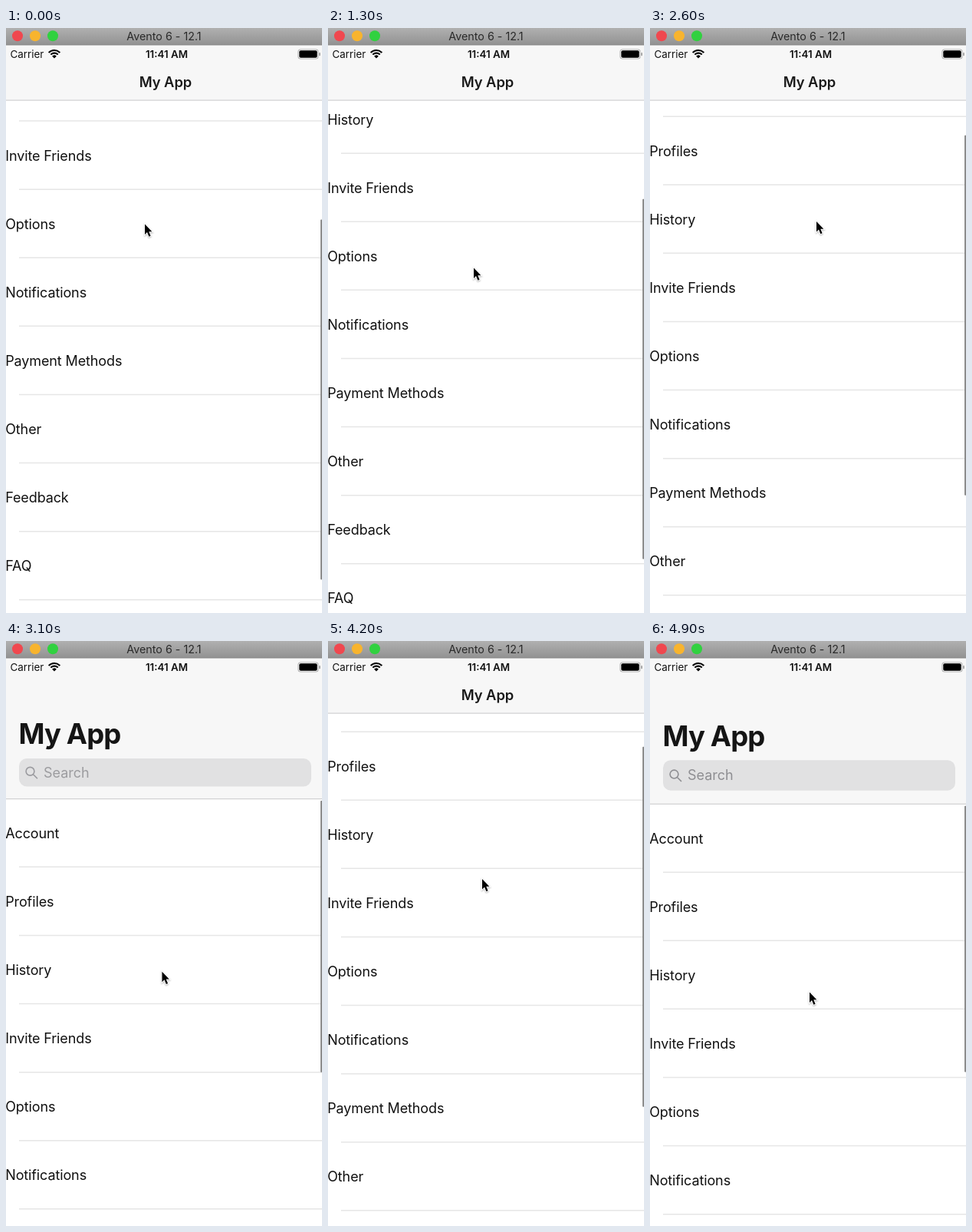
Animation, 412 px wide and 762 px high, one loop 5 s. Source, as an HTML page with a canvas:

```html
<!DOCTYPE html>
<html lang="en">
<head>
<meta charset="utf-8">
<title>My App</title>
<style>
html, body { margin: 0; width: 100%; height: 100%; overflow: hidden; background: #fff; }
canvas { display: block; width: 412px; height: 762px; }
</style>
</head>
<body>
<canvas id="stage"></canvas>
<script>
const W = 412, HT = 762, LOOP = 5000, STEP = 100;
const NAV = 94, REST = 210, ROW = 89.1;
const FONT = 'Inter, "Liberation Sans", sans-serif';
const ROWS = ['Account', 'Profiles', 'History', 'Invite Friends', 'Options',
  'Notifications', 'Payment Methods', 'Other', 'Feedback', 'FAQ'];

// [time, centre of the first row]
const SCROLL = [[0, -101.3], [350, -106], [700, -104], [1000, -88], [1300, -59.2],
  [1500, 75], [1750, 254], [1900, 242], [2250, 140], [2600, 71], [2700, 78],
  [3000, 225], [3200, 262], [3400, 255], [3700, 253], [4200, 74], [4350, 78],
  [4750, 263], [4900, 257]];
// [time, x, y] of the pointer tip
const POINTER = [[0, 181, 255.5], [350, 181, 251], [700, 184, 255], [1000, 187, 275],
  [1300, 190, 312.5], [1500, 193, 385], [1700, 194, 413], [1900, 195.5, 402],
  [2250, 206, 320], [2600, 217, 252], [2700, 216, 256], [3000, 206, 410],
  [3250, 201, 446], [3600, 200, 441.5], [3750, 200, 436], [4200, 201, 310],
  [4350, 202, 314], [4700, 207, 452], [4900, 208, 457.5]];

const canvas = document.getElementById('stage');
const dpr = window.devicePixelRatio || 1;
canvas.width = W * dpr;
canvas.height = HT * dpr;
const g = canvas.getContext('2d');
g.scale(dpr, dpr);

const clamp = (v, a = 0, b = 1) => Math.min(b, Math.max(a, v));

// Monotone cubic through the keys: flat at turning points, smooth elsewhere
function curve(keys, t, k = 1) {
  const n = keys.length - 1;
  if (t >= keys[n][0]) return keys[n][k];
  const i = keys.findIndex((p, j) => j < n && t < keys[j + 1][0]);
  const rate = j => (keys[j + 1][k] - keys[j][k]) / (keys[j + 1][0] - keys[j][0]);
  const slope = j => {
    if (j === 0 || j === n) return 0;
    const a = rate(j - 1), b = rate(j);
    return a * b > 0 ? 2 * a * b / (a + b) : 0;
  };
  const d = keys[i + 1][0] - keys[i][0], u = (t - keys[i][0]) / d, v = 1 - u;
  return v * v * (1 + 2 * u) * keys[i][k] + u * u * (3 - 2 * u) * keys[i + 1][k]
    + d * u * v * (v * slope(i) - u * slope(i + 1));
}

function rect(x, y, w, h, color, r = 0) {
  g.fillStyle = color;
  g.beginPath();
  g.roundRect(x, y, w, h, r);
  g.fill();
}

function dot(x, y, r, color) {
  g.fillStyle = color;
  g.beginPath();
  g.arc(x, y, r, 0, 7);
  g.fill();
}

function text(s, x, y, size, { weight = 400, color = '#111', align = 'left', gap = 0 } = {}) {
  g.font = `${weight} ${size}px ${FONT}`;
  g.letterSpacing = gap + 'px';
  g.textAlign = align;
  g.fillStyle = color;
  g.fillText(s, x, y);
}

function drawList(first) {
  ROWS.forEach((name, i) => {
    const y = first + i * ROW;
    text(name, -0.8, y + 6.6, 18, { gap: -0.12 });
    rect(17, y + 43.4, W - 17, 1.5, '#e6e6e6');
  });
}

function drawSearch(top, h) {
  if (h <= 0) return;
  rect(17, top, 381, h, '#e1e1e2', Math.min(10, h / 2));
  g.globalAlpha = clamp((h - 29) / 9);
  const y = top + h / 2;
  g.strokeStyle = '#8e8e92';
  g.lineWidth = 1.6;
  g.beginPath();
  g.arc(31.5, y - 1.5, 5.4, 0, 7);
  g.moveTo(35.5, y + 2.5);
  g.lineTo(41, y + 8);
  g.stroke();
  text('Search', 49, y + 6.3, 18, { color: '#8e8e92' });
  g.globalAlpha = 1;
}

function drawHeader(bottom) {
  rect(0, 22, W, bottom - 22, '#f7f7f7');
  const over = Math.max(0, bottom - REST);
  const lift = Math.min(0, bottom - 153);
  g.save();
  g.beginPath();
  g.rect(0, NAV - 1, W, Math.max(0, bottom - NAV + 1));
  g.clip();
  if (bottom > NAV + 1) {
    text('My App', 16.5, 134.3 + over + lift, 36.5, { weight: 700, gap: -0.9, color: '#151515' });
    drawSearch(153 + over, clamp(bottom - 169, 0, 39.5));
  }
  g.restore();
  g.globalAlpha = clamp((112 - bottom) / 16);
  text('My App', 208, 76.6, 18.4, { weight: 600, align: 'center', gap: -0.1, color: '#1a1a1a' });
  g.globalAlpha = 1;
  rect(0, bottom - 0.6, W, 1.4, '#d2d2d3');
}

function drawStatus() {
  text('Carrier', 5.5, 39, 13.4);
  text('11:41 AM', 209.5, 39, 13.4, { weight: 600, align: 'center' });
  g.strokeStyle = '#000';
  g.lineWidth = 2.1;
  for (const r of [10, 6.4]) {
    g.beginPath();
    g.arc(63, 39, r, -Math.PI * 0.76, -Math.PI * 0.24);
    g.stroke();
  }
  g.fillStyle = '#000';
  g.beginPath();
  g.moveTo(63, 39.6);
  g.arc(63, 39.6, 4, -Math.PI * 0.76, -Math.PI * 0.24);
  g.fill();
  rect(380.5, 27.5, 27, 13, '#a5a5a5', 3.5);
  rect(381.3, 28.3, 25.4, 11.4, '#f7f7f7', 3);
  rect(382.3, 29.3, 23.4, 9.4, '#000', 2);
  rect(408.2, 32, 1.6, 4.2, '#999', 0.8);
}

function drawWindowBar() {
  const fill = g.createLinearGradient(0, 0, 0, 22);
  fill.addColorStop(0, '#b0b0b0');
  fill.addColorStop(1, '#929292');
  rect(0, 0, W, 22, fill);
  rect(0, 21.5, W, 1, '#858585');
  ['#f0484f', '#f8b42e', '#31d140'].forEach((c, i) => dot(15 + i * 23, 10.3, 7, c));
  text('Avento 6 - 12.1', 206, 15.6, 14.3, { align: 'center', color: '#2a2a2a' });
}

function drawScrollbar(first, bottom) {
  const top = bottom + 2.4 + Math.max(0, 139 - first) * 0.637;
  const end = first < 139 ? top + 469 : 565 - (first - 139) * 0.03;
  rect(410, top, 3, end - top, '#8c8c8c', 1);
}

function drawPointer(x, y) {
  g.save();
  g.translate(x, y);
  g.shadowColor = 'rgba(0,0,0,.3)';
  g.shadowBlur = 2;
  g.shadowOffsetY = 1;
  const arrow = new Path2D('M0 0V13.4L3 10.6L5.4 16.2L7.6 15.2L5.3 9.8H9.4Z');
  g.strokeStyle = '#fff';
  g.lineWidth = 2;
  g.stroke(arrow);
  g.shadowColor = 'transparent';
  g.fillStyle = '#000';
  g.fill(arrow);
  g.restore();
}

function draw(t) {
  const first = curve(SCROLL, t);
  const bottom = Math.max(NAV, first - 44.7);
  rect(0, 0, W, HT, '#fff');
  drawList(first);
  drawHeader(bottom);
  drawStatus();
  drawWindowBar();
  drawScrollbar(first, bottom);
  drawPointer(curve(POINTER, t, 1), curve(POINTER, t, 2));
}

const start = performance.now();
function tick() {
  const t = (performance.now() - start) % LOOP;
  draw(Math.floor(t / STEP) * STEP);
  requestAnimationFrame(tick);
}
tick();
</script>
</body>
</html>
```
